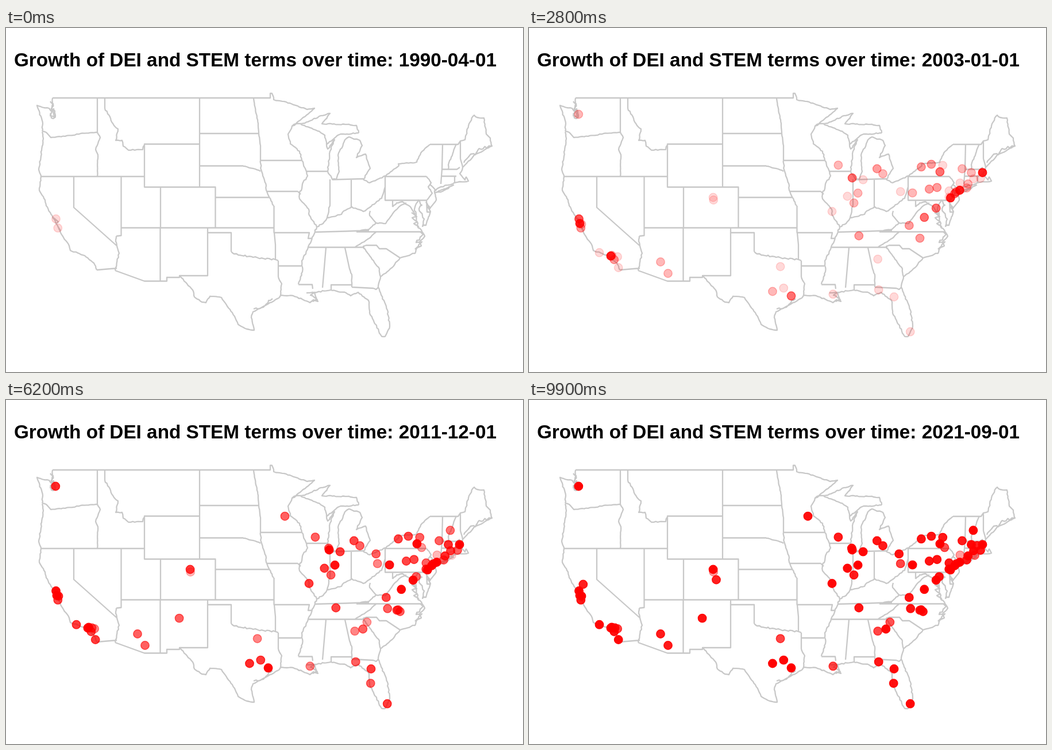
An HTML page with a canvas that plays this animation: 900 px wide and 600 px high, repeating every 10000 ms.

```html
<!DOCTYPE html>
<html lang="en">
<head>
<meta charset="utf-8">
<title>Growth of terms over time</title>
<style>
html, body { margin: 0; width: 100%; height: 100%; overflow: hidden; background: #fff }
canvas { display: block }
</style>
</head>
<body>
<canvas id="stage" width="900" height="600"></canvas>
<script>
const ctx = document.getElementById('stage').getContext('2d');
const map = new Path2D();
const points = [];

const parse = text => text.trim().split(/\s+/).map(p => p.split(',').map(Number));
const noise = n => { const v = Math.sin(n) * 43758.5453; return v - Math.floor(v) - 0.5; };
const straight = d => map.addPath(new Path2D(d));

// A natural border: a few key points joined by small seeded wiggles.
function rough(text, size = 1.8) {
  const pts = parse(text);
  map.moveTo(...pts[0]);
  for (let i = 1; i < pts.length; i++) {
    const [x, y] = pts[i - 1], [u, v] = pts[i];
    const n = Math.max(1, Math.round(Math.hypot(u - x, v - y) / 3.5));
    for (let k = 1; k <= n; k++) {
      const s = k < n ? size : 0, seed = x * 3.1 + y * 7.7 + k;
      map.lineTo(x + (u - x) * k / n + s * noise(seed), y + (v - y) * k / n + s * noise(seed + 0.37));
    }
  }
}

// Places whose first term appears at the same step and which then grow alike.
function wave(start, rate, text) {
  for (const [x, y] of parse(text)) points.push({ x, y, start, rate });
}

// State lines, west to east
straight('M81 122H460V114H463L466 121M159 122V182M61 259H241M172 122V140M241 202.5H337V277.5H241ZM337 122V202');
straight('M118 259V313L193 380M200.5 259V362L192 363M269 277.5H364.5V348.5H269ZM200 348.5H466.5M268.5 348V441');
straight('M158 422L193 419M190 423L241 441.5H280V435H302V432H351V348M351 357H392V390');
straight('M337 184H440M337 240.5H413M364.5 295.5H459M443 207V231H514M453 285H508M466.5 310V357H528L526 367H533');
straight('M467 357L469 378V404M474 406V434M474 415H514M509 447.5H533L534 455M522 250H561M564 264V307M601 263V312M568 264.5L622 263');
straight('M537 356L592 354.5L632 353M610 355.5H724M527 382.5H624M557 383L553 430L551 453M590 383L598 420M566 457V448H602M602 452L640 454');
straight('M621 381L627 379H645L650 385H662L686 401M660 259V300.5H732L733 321H739M660 259H732M673 300V312');
straight('M738 203H787L791 197V228M760 203L759 246L757 272M760 246.5H785L790 243M757 258.5H784M781 259V270');

// Pacific coast
rough('81,122 80,137 84,155 77,153 80,146 75,140 66,139 54,135 64,167 63,180');
rough('77,128 82,132 77,150 82,158 86,152 83,140', 4);
rough('63,181 65,193 57,247 61,259 58,283 68,300 70,310 90,345 95,357 110,380 112,388 137,397 153,410 158,422', 1.5);
rough('81,329 91,338 87,341 95,354');

// Western rivers and ridges
rough('63,180 70,182 78,191 117,187 130,184 160,182', 1);
rough('159,182 164,191 156,212 160,221 159,259', 1);
rough('172,140 188,170 195,176 191,196 202,196 204,206 213,213 238,212 241,204');
rough('192,363 191,372 197,393 191,418 190,423');

// Gulf coast
rough('303,433 325,457 328,469 341,478 348,479 355,468 375,470 398,503 404,517 419,525 432,527 427,505 430,495 449,485 475,471', 1.3);
rough('475,471 478,466 500,467 529,479 535,474 543,477 537,461 565,457 592,462 600,467 613,461 631,475 633,497 649,529 654,538 660,538 668,520 664,492 648,452');
rough('431,490 444,488 464,472', 3);
rough('523,462 537,462 530,466 542,474 532,476', 3);

// Atlantic coast
rough('648,452 652,434 672,418 686,401 712,393 715,384 723,380 720,373 729,363 724,355');
rough('712,386 724,373 714,374 726,360 721,355', 3);
rough('724,355 716,345 714,325 711,316 718,300 724,309 719,315 728,333 725,346 731,344 739,320 731,303', 3);
rough('719,347 710,341 716,338 707,331 715,329 706,322');
rough('731,303 738,315 749,300 746,284 757,277 790,268 805,267 801,260 799,265 790,254 793,250');
rough('747,287 775,276 779,274 757,286 747,287', 1.5);
rough('793,250 795,243 818,220 846,206 843,192 836,185 832,157 820,156 815,152 806,167 799,195 791,197');
rough('797,235 809,220 817,221 822,212 845,206', 4);

// Great Lakes
rough('466,121 466,125 494,131 524,142 537,140 512,161 498,171 505,167 520,166 545,154 564,149 550,167 590,168 610,170 614,183');
rough('614,183 580,186 558,203 560,211 572,195 564,215 560,250 568,264 575,264 580,250 578,222 590,195 597,190 616,196 620,205 610,226 626,220 634,245 622,264');
rough('622,264 633,270 661,258 684,240 683,237 715,234 722,218 738,203', 1.5);
rough('513,168 545,180 555,187 558,203', 1.5);

// Mississippi, Missouri and Red rivers
rough('498,171 491,185 495,202 511,215 515,231 525,258 516,272 515,280 511,288 511,298 527,316 527,324 541,347 530,375 515,406 516,425 509,447');
rough('431,122 435,148 438,160 440,184 443,209', 1);
rough('508,285 513,290', 1);
rough('413,241 434,246 443,250', 1.5);
rough('443,231 444,247 453,275 453,283 466,310', 1.5);
rough('392,390 397,394 430,400 469,404 474,406', 2.8);
rough('474,434 480,446 478,466', 1.5);

// Ohio river, Appalachians and the northeast
rough('541,347 552,341 559,331 584,325 588,319 602,312 622,320 633,313 654,297 660,277');
rough('564,307 559,331');
rough('615,354 632,351 644,340 633,327 634,319');
rough('644,340 661,341 678,318 690,308 697,305');
rough('673,312 680,305 690,303 703,311 712,325');
rough('608,382 632,367 644,356', 1);
rough('621,381 650,420 652,434', 1.5);
rough('598,420 602,430 602,452', 1);
rough('640,454 644,456 648,452', 1);
rough('732,259 740,270 735,277 742,288 733,300', 1.5);
rough('738,273 749,284', 1);
rough('784,203 771,235 770,246', 1.5);
rough('791,228 795,243', 1);

wave(0, 1.3, '87,333');
wave(0, 0.45, '90.3,348.8');
wave(3, 3, '88.5,341 142.5,397.7 789.5,252.2 749.8,283 733.8,296.3');
wave(4, 0.5, `661.8,344.4 682.9,242.3 700.4,237.6 710.3,278.2 696.8,281 574.3,362.5
  680.5,366.6 605.8,245.5 148.3,404`);
wave(10, 0.08, '321.2,300 750.4,270.4');
wave(11, 1.8, '562.6,261.5 715.4,250.8 456.5,467.3 708.7,314.2 741,289 743.5,286 688.2,330.3');
wave(13, 0.5, '229,408 242,428 616,254.2 565.6,305.2 538.4,239.2 754,245.5 762,279');
wave(15, 1, '86.3,150.5 91.5,342 144,396.5 424,459.5 764.3,272 770,252.2');
wave(16, 0.3, '154.2,399 437.6,416.2 607.2,403.1 529.3,464.3 646.7,285.4');
wave(20, 2, '572.6,288 667.6,287.6');
wave(22, 1, `122.5,391.8 155.7,418 554.3,293.5 527.5,320 581.6,264.6 774,263 663.7,529.8
  635.5,469 731.2,295 320.6,295.5 443.3,453.6`);
wave(26, 0.7, '608.7,456.7 720.3,239.6 731.3,284.3 786,262');
wave(32, 0.9, `301.6,380.6 149.5,397.5 485.5,202.7 561.8,258.5 634.7,494.1 664.2,363.8
  682.7,366 686,369 714,308.2 644.2,268.4`);
wave(34, 0.35, '628.4,387.5 723.5,257.3');
wave(41, 1.5, '621.3,399.5');
wave(47, 2, '773.4,227.3');
wave(60, 0.5, '776,271');
wave(66, 2, '94.3,321.5 326,313.5 780,254');

// Sparse early dates pass quickly, later ones at a steady pace.
function dateText(frame) {
  const m = Math.round(65.2 * (1 - Math.max(0, 1 - frame / 30) ** 2.3) + 3.147 * frame) + 3;
  return `${1990 + Math.floor(m / 12)}-${String(m % 12 + 1).padStart(2, '0')}-01`;
}

function draw(now) {
  const frame = Math.floor(now / 100) % 100;
  ctx.globalAlpha = 1;
  ctx.fillStyle = '#fff';
  ctx.fillRect(0, 0, 900, 600);

  ctx.strokeStyle = '#c8c8c8';
  ctx.lineWidth = 2.3;
  ctx.lineJoin = 'round';
  ctx.stroke(map);

  ctx.fillStyle = '#000';
  ctx.font = 'bold 33.3px "Liberation Sans", Arial, sans-serif';
  ctx.fontKerning = 'none';
  ctx.fillText('Growth of DEI and STEM terms over time: ' + dateText(frame), 13.9, 67);

  ctx.fillStyle = ctx.strokeStyle = '#f00';
  ctx.lineWidth = 1.5;
  for (const { x, y, start, rate } of points) {
    if (frame < start) continue;
    const layers = Math.round(1 + rate * ((frame - start) / 10) ** 1.5);
    ctx.globalAlpha = 1 - 0.85 ** layers;
    ctx.beginPath();
    ctx.arc(x, y, 7.2, 0, 7);
    ctx.fill();
    ctx.stroke();
  }
}

const start = performance.now();
function tick() {
  draw(performance.now() - start);
  requestAnimationFrame(tick);
}
tick();
</script>
</body>
</html>
```
